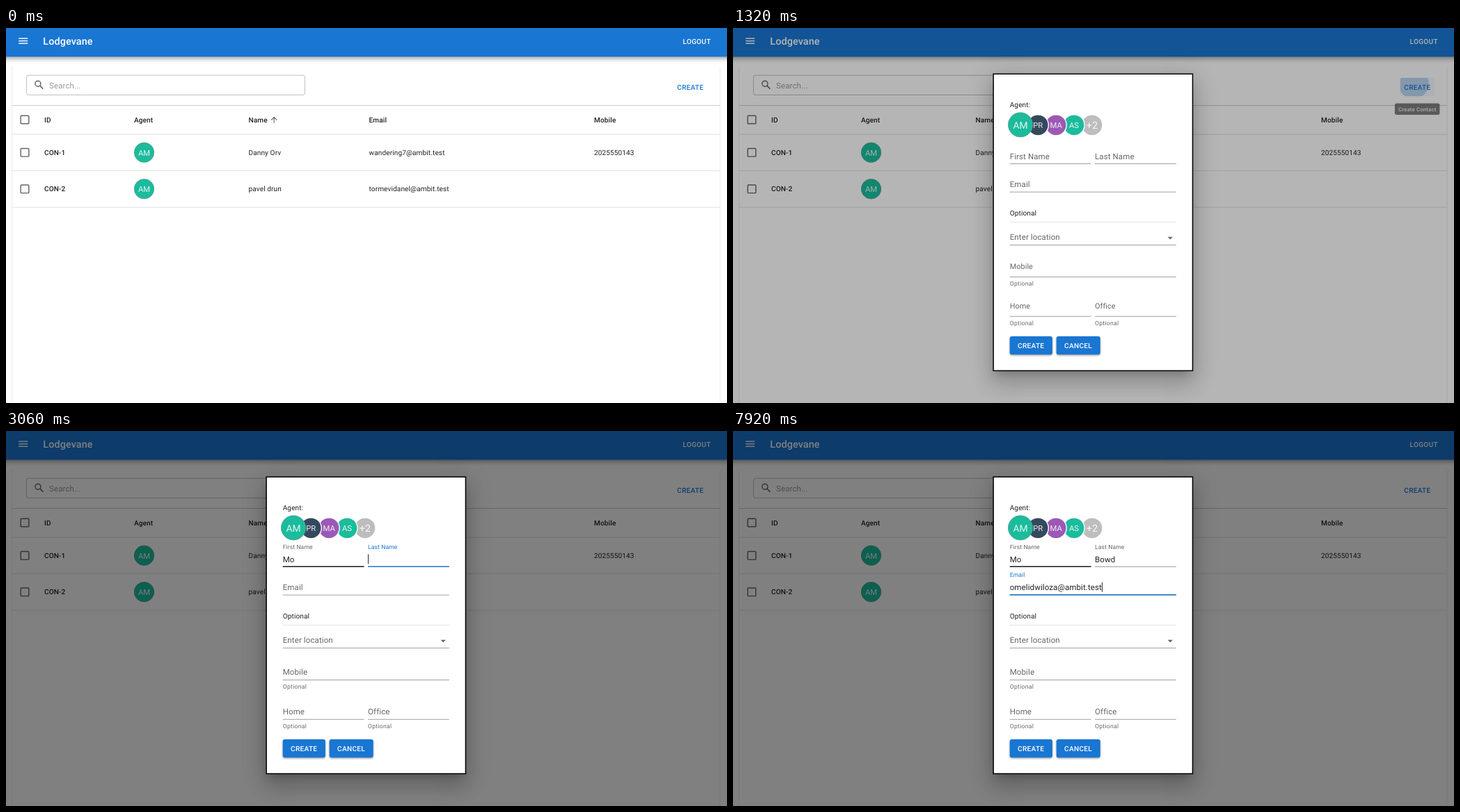
An HTML page with a canvas for the animation above (8 s loop, 1036x540 px).

```html
<!DOCTYPE html>
<html lang="en">
<head>
<meta charset="utf-8">
<title>Create contact</title>
<style>
  html, body { margin: 0; width: 1036px; height: 540px; overflow: hidden; background: #fff; }
  canvas { display: block; }
</style>
</head>
<body>
<canvas id="stage" width="1036" height="540"></canvas>
<script>
const ctx = document.getElementById('stage').getContext('2d');
const LOOP = 8000;
const UNIT = 0.7194; // one layout pixel on the stage
const BLUE = '#1976d2', TEAL = '#1abc9c';
const INK = 'rgba(0,0,0,.87)', MUTED = 'rgba(0,0,0,.6)';
const BODY = 14 * UNIT, INPUT = 16 * UNIT, SMALL = 12 * UNIT;

const OPEN = 1271;   // dialog opens
const PRESS = 1187;  // button pressed
const HOVER = 925;   // pointer reaches the button

const clamp = v => Math.min(1, Math.max(0, v));

// Cubic bezier with control points (x1, 0) and (x2, 1).
function bezier(x1, x2, t) {
  t = clamp(t);
  let lo = 0, hi = 1;
  for (let i = 0; i < 24; i++) {
    const s = (lo + hi) / 2, r = 1 - s;
    if (3 * r * r * s * x1 + 3 * r * s * s * x2 + s * s * s < t) lo = s; else hi = s;
  }
  return 3 * lo * lo - 2 * lo * lo * lo;
}
const easeInOut = t => bezier(0.4, 0.2, t);
const easeOut = t => bezier(0, 0.2, t);

// Text placed by its left (or centre) x and the middle of its capitals.
function text(str, x, cy, size, color, { weight = 400, spacing = 0.0107, align = 'left' } = {}) {
  ctx.font = `${weight} ${size}px Roboto, sans-serif`;
  ctx.letterSpacing = spacing * size + 'px';
  ctx.textAlign = align;
  ctx.fillStyle = color;
  ctx.fillText(str, x, cy + size * 0.3555);
  return ctx.measureText(str).width;
}

function box(x, y, w, h, color) {
  ctx.fillStyle = color;
  ctx.fillRect(x, y, w, h);
}

function roundBox(x, y, w, h, r) {
  ctx.beginPath();
  ctx.roundRect(x, y, w, h, r);
}

function disc(x, y, r, color) {
  ctx.beginPath();
  ctx.arc(x, y, r, 0, Math.PI * 2);
  ctx.fillStyle = color;
  ctx.fill();
}

function polyline(points, color, width) {
  ctx.beginPath();
  points.forEach(([x, y]) => ctx.lineTo(x, y));
  ctx.strokeStyle = color;
  ctx.lineWidth = width;
  ctx.stroke();
}

function withShadow(alpha, blur, dy, draw) {
  ctx.save();
  ctx.shadowColor = `rgba(0,0,0,${alpha})`;
  ctx.shadowBlur = blur;
  ctx.shadowOffsetY = dy;
  draw();
  ctx.restore();
}

function avatar(x, y, r, label, size, color = TEAL) {
  disc(x, y, r, color);
  text(label, x, y + 0.3, size, 'rgba(255,255,255,.9)', { align: 'center', spacing: 0 });
}

function ringedAvatar(x, y, r, size) {
  avatar(x, y, r, 'AM', size);
  ctx.beginPath();
  ctx.arc(x, y, r - 0.5, 0, Math.PI * 2);
  ctx.strokeStyle = 'rgba(140,140,140,.55)';
  ctx.lineWidth = 1;
  ctx.stroke();
}

function checkbox(cy) {
  roundBox(21.2, cy - 5.8, 11.6, 11.6, 0.9);
  ctx.strokeStyle = MUTED;
  ctx.lineWidth = 1.44;
  ctx.stroke();
}

function appBar() {
  withShadow(0.38, 7, 2.2, () => box(-20, -20, 1076, 61.4, BLUE));
  for (let i = 0; i < 3; i++) box(18.2, 14.3 + i * 3.6, 13, 1.44, '#fff');
  text('Lodgevane', 53.3, 18.8, 20 * UNIT, '#fff', { weight: 500, spacing: 0.0075 });
  text('LOGOUT', 972.5, 19, BODY, '#fff', { weight: 500, spacing: 0.0286 });
}

function searchBox() {
  roundBox(29.4, 68.1, 400, 28.3, 2.9);
  ctx.strokeStyle = 'rgba(0,0,0,.25)';
  ctx.lineWidth = 1;
  ctx.stroke();
  ctx.beginPath();
  ctx.arc(45.9, 80.2, 4, 0, Math.PI * 2);
  ctx.strokeStyle = MUTED;
  ctx.lineWidth = 1.44;
  ctx.stroke();
  polyline([[48.8, 83.1], [53.3, 87.6]], MUTED, 1.6);
  text('Search...', 62, 82.5, INPUT, 'rgba(0,0,0,.4)', { spacing: 0.0094 });
}

function row(cy, id, name, email, mobile) {
  checkbox(cy);
  text(id, 55, cy, BODY, INK, { weight: 500 });
  ringedAvatar(198.5, cy, 14.5, 11.3);
  text(name, 348.5, cy, BODY, INK);
  text(email, 521.5, cy, BODY, INK);
  text(mobile, 845, cy, BODY, INK);
}

function table() {
  for (const x of [8, 1025.5]) box(x, 56, 1, 484, '#ebebeb');
  searchBox();
  box(8.5, 111, 1017.5, 1, '#cdcdcd');
  for (const y of [152.7, 205.2, 257.7]) box(8.5, y, 1017.5, 0.9, '#dcdcdc');
  checkbox(132);
  const heads = [['ID', 55], ['Agent', 184], ['Name', 348.5], ['Email', 521.5], ['Mobile', 845]];
  for (const [label, x] of heads) text(label, x, 132.3, BODY, INK, { weight: 500 });
  polyline([[385.1, 136.8], [385.1, 128.8]], MUTED, 1.1);
  polyline([[381.2, 132.5], [385.1, 128.6], [389, 132.5]], MUTED, 1.1);
  row(179.3, 'CON-1', 'Danny Orv', 'wandering7@ambit.test', '2025550143');
  row(231.8, 'CON-2', 'pavel drun', 'tormevidanel@ambit.test', '');
}

function createButton(t) {
  const hover = easeInOut((t - HOVER) / 156) * (1 - easeInOut((t - 1400) / 156));
  roundBox(958.7, 71.8, 49.6, 26.4, 2.9);
  ctx.fillStyle = `rgba(25,118,210,${0.05 * hover})`;
  ctx.fill();
  if (t >= PRESS && t < 1680) {
    const grow = easeInOut((t - PRESS) / 344);
    const fade = 1 - easeInOut((t - 1340) / 320);
    ctx.save();
    ctx.clip();
    disc(978, 80, 37 * grow, `rgba(25,118,210,${(0.2 + 0.1 * grow) * fade})`);
    ctx.restore();
  }
  text('CREATE', 964.3, 85.2, BODY, BLUE, { weight: 500, spacing: 0.0286 });
}

function tooltip(t) {
  const shown = easeInOut((t - 1000) / 140) * (1 - easeInOut((t - 1305) / 85));
  if (shown <= 0) return;
  ctx.save();
  ctx.globalAlpha = shown;
  ctx.translate(983.2, 108.5);
  ctx.scale(0.75 + 0.25 * shown, 0.5625 + 0.4375 * shown);
  roundBox(-33.2, 0, 66.4, 17.5, 2.9);
  ctx.fillStyle = 'rgba(97,97,97,.92)';
  ctx.fill();
  text('Create Contact', 0, 8.8, 8.2, '#fff', { weight: 500, align: 'center' });
  ctx.restore();
}

function labelColor(focus) {
  const mix = (a, b) => Math.round(a + (b - a) * focus);
  return `rgb(${mix(102, 25)},${mix(102, 118)},${mix(102, 210)})`;
}

// Underlined input whose label floats up as `shrink` goes to 1.
function field(label, x, w, cy, bottom, { shrink = 0, focus = 0, hover = 0, value = '', caret = false } = {}) {
  box(x, bottom - 0.9, w, 0.9, 'rgba(0,0,0,.42)');
  if (hover > 0) box(x, bottom - 1.5, w, 1.5, `rgba(0,0,0,${0.87 * hover})`);
  if (focus > 0) box(x + w * (1 - focus) / 2, bottom - 1.5, w * focus, 1.5, BLUE);
  text(label, x, cy - 17.8 * shrink, INPUT * (1 - 0.25 * shrink), labelColor(focus), { spacing: 0.0094 });
  const width = value ? text(value, x, cy, INPUT, INK, { spacing: 0.0094 }) : 0;
  if (caret) box(x + width, cy - 7.2, 0.9, 14, '#111');
}

const typed = [
  { label: 'First Name', x: 397.7, w: 116.8, cy: 184.6, bottom: 196, from: 1920, to: 2850,
    value: 'Mo', keys: [2520, 2730], hoverAt: 1735 },
  { label: 'Last Name', x: 520, w: 116.8, cy: 184.6, bottom: 196, from: 2850, to: 3950,
    value: 'Bowd', keys: [3210, 3360, 3510, 3600] },
  { label: 'Email', x: 397.7, w: 239.1, cy: 225, bottom: 236.6, from: 3950, to: Infinity,
    value: 'omelidwiloza@ambit.test',
    keys: [5070, 5160, 5310, 5460, 5550, 5670, 5790, 5910, 5970, 6060, 6210, 6300, 6600,
           6900, 7000, 7110, 7200, 7350, 7590, 7740, 7890, 7890, 7920] },
];

function typedField(f, t) {
  const shrink = easeOut((t - f.from) / 200);
  const done = f.keys.filter(k => k <= t);
  const active = t >= f.from && t < f.to;
  const lastKey = done.length ? done[done.length - 1] : f.from;
  field(f.label, f.x, f.w, f.cy, f.bottom, {
    shrink,
    focus: shrink * (1 - easeOut((t - f.to) / 200)),
    hover: f.hoverAt ? easeInOut((t - f.hoverAt) / 200) : 0,
    value: f.value.slice(0, done.length),
    caret: active && Math.floor((t - lastKey) / 450) % 2 === 0,
  });
}

function solidButton(label, x, w) {
  withShadow(0.4, 3, 1.3, () => {
    roundBox(x, 443.9, w, 26.3, 2.9);
    ctx.fillStyle = BLUE;
    ctx.fill();
  });
  text(label, x + 11.4, 457.2, BODY, '#fff', { weight: 500, spacing: 0.0286 });
}

function agents() {
  const group = [['PR', '#34495e', 11.3], ['MA', '#9b59b6', 11.3], ['AS', TEAL, 11.3], ['+2', '#bdbdbd', 14.4]];
  for (let i = group.length - 1; i >= 0; i--) {
    const [label, color, size] = group[i], x = 438.2 + i * 25.9;
    disc(x, 139.8, 15.8, '#fff');
    avatar(x, 139.8, 14.4, label, size, color);
  }
  ringedAvatar(413, 139.4, 17.9, 13.8);
}

function dialogFrame() {
  const [x, y, w, h] = [373.4, 65.4, 287.8, 428.8];
  const shadows = [[0.12, 33, 6.5, 5.8], [0.14, 27, 17.3, 2.2], [0.2, 11, 7.9, -5]];
  for (const [alpha, blur, dy, spread] of shadows)
    withShadow(alpha, blur, dy, () => box(x - spread, y - spread, w + 2 * spread, h + 2 * spread, '#000'));
}

// Shadows only, kept outside the panel by clearing its spread area.
function dialogShadow() {
  const [x, y, w, h] = [373.4, 65.4, 287.8, 428.8];
  const far = 3000;
  for (const [alpha, blur, dy, spread] of [[0.12, 33, 6.5, 5.8], [0.14, 27, 17.3, 2.2], [0.2, 11, 7.9, -5]]) {
    ctx.save();
    ctx.shadowColor = `rgba(0,0,0,${alpha})`;
    ctx.shadowBlur = blur;
    ctx.shadowOffsetX = far;
    ctx.shadowOffsetY = dy;
    box(x - spread - far, y - spread, w + 2 * spread, h + 2 * spread, '#000');
    ctx.restore();
  }
  box(x, y, w, h, '#000');
  box(x + 1.5, y + 1.5, w - 3, h - 3, '#fff');
}

function dialog(t) {
  dialogShadow();
  text('Agent:', 397.7, 110.6, BODY, INK);
  agents();
  for (const f of typed) typedField(f, t);

  text('Optional', 397.7, 266.7, BODY, INK);
  box(397.7, 279.2, 239.1, 0.8, '#dedede');
  field('Enter location', 397.7, 239.1, 301.2, 312.9);
  ctx.beginPath();
  ctx.moveTo(624.6, 300.8);
  ctx.lineTo(631.8, 300.8);
  ctx.lineTo(628.2, 304.4);
  ctx.fillStyle = MUTED;
  ctx.fill();

  const shrink = 1 - easeOut((t - OPEN) / 125);
  const phones = [['Mobile', 397.7, 239.1, 347.4, 358.9], ['Home', 397.7, 116.8, 404.2, 415.7],
                  ['Office', 520, 116.8, 404.2, 415.7]];
  for (const [label, x, w, cy, bottom] of phones) {
    field(label, x, w, cy, bottom, { shrink });
    text('Optional', x, bottom + 9.2, SMALL, MUTED, { spacing: 0.0333 });
  }
  solidButton('CREATE', 397.7, 61.2);
  solidButton('CANCEL', 464.7, 63);
}

function render(t) {
  box(0, 0, 1036, 540, '#fff');
  table();
  createButton(t);
  appBar();
  tooltip(t);
  if (t >= 1275) {
    box(0, 0, 1036, 540, `rgba(0,0,0,${0.5 * easeInOut((t - OPEN + 3) / 138)})`);
    dialog(t);
  }
}

ctx.textRendering = 'geometricPrecision';
const start = performance.now();
function tick() {
  render((performance.now() - start) % LOOP);
  requestAnimationFrame(tick);
}
tick();
</script>
</body>
</html>
```
